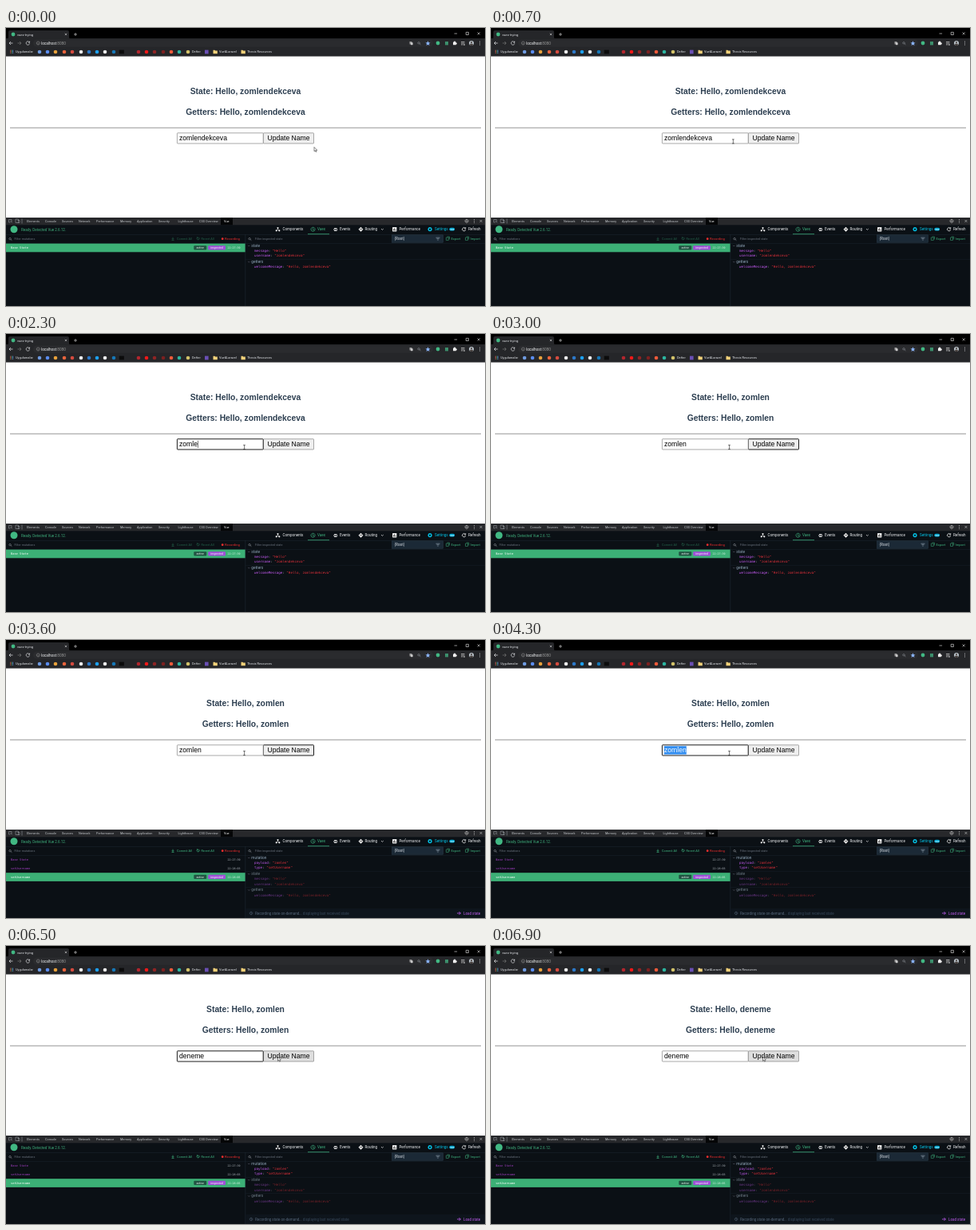
An HTML page for the animation above (7100 ms loop, 600x349 px).

```html
<!DOCTYPE html>
<html lang="en">
<head>
<meta charset="utf-8">
<style>
  html, body { margin: 0; width: 100%; height: 100%; overflow: hidden; background: #fff; }
  svg { display: block; width: 600px; height: 349px; font-family: Roboto, sans-serif; white-space: pre; }
  .page { font-family: "Liberation Sans", Arial, sans-serif; }
  .mono { font-family: "DejaVu Sans Mono", monospace; }
</style>
</head>
<body>
<svg viewBox="0 0 600 349"><g id="fixed"></g><g id="live"></g></svg>
<script>
const LOOP = 7100, STEP = 100;
const FULL = 'zomlendekceva', SHORT = 'zomlen', LAST = 'deneme';
const GREEN = '#41b883', GREY = '#9aa0a6', LIGHT = '#e4e7eb';

const rect = (x, y, w, h, fill, extra = '') =>
  `<rect x="${x}" y="${y}" width="${w}" height="${h}" fill="${fill}" ${extra}/>`;
const dot = (x, y, r, fill) => `<circle cx="${x}" cy="${y}" r="${r}" fill="${fill}"/>`;
const line = (d, color, width = 0.7) =>
  `<path d="${d}" fill="none" stroke="${color}" stroke-width="${width}"/>`;
const text = (x, y, s, size, fill, extra = '') =>
  `<text x="${x}" y="${y}" font-size="${size}" fill="${fill}" ${extra}>${s}</text>`;
const mono = (x, y, s, size, fill) => text(x, y, s, size, fill, 'class="mono"');
const row = (items, y, size, fill) => items.map(([x, s]) => text(x, y, s, size, fill)).join('');
const lens = (x, y) => line(`M${x - 1} ${y - 1}a1.2 1.2 0 1 0 .1 0M${x} ${y + 1}l1.4 1.3`, GREY, 0.6);

function browserChrome() {
  const icons = [[42, '#6f9be0'], [52, '#5b8def'], [62, '#e9a23b'], [73, '#e8643c'], [83, '#d54b3f'],
    [94, '#eee'], [104, '#2d78c8'], [114, '#1da1f2'], [124, '#eee'], [135, '#1678b8'],
    [166, '#b3262e'], [176, '#f01818'], [186, '#8f2424'], [197, '#7c2020'], [207, '#ee5a3a'],
    [217, '#2cb5a0'], [228, '#d4c36a']];
  const folder = x => `<path d="M${x} 27.7h2l.7.8h2.6v3.8h-5.3z" fill="#f3d27a"/>`;
  let apps = '';
  for (let i = 0; i < 9; i++)
    apps += rect(5.2 + i % 3 * 1.5, 27.7 + Math.floor(i / 3) * 1.5, 1, 1, ['#ea5a4f', '#58a55c', '#4f8ff0'][i % 3]);
  return rect(0, 0, 600, 13.5, '#000') +
    rect(0, 13, 600, 22.6, '#252629') +
    `<path d="M1 13.5q2 0 2-2V5q0-2 2-2H77q2 0 2 2v6.5q0 2 2 2z" fill="#252629"/>` +
    dot(9, 8, 2.4, GREEN) + text(14, 9.6, 'vuex-trying', 4.15, LIGHT) +
    line('M73.8 6.7l2.4 2.4m0-2.4l-2.4 2.4M87 6v4m-2-2h4', '#ddd', 0.6) +
    line('M561.5 7h3.6M576.2 5.3h3.2v3.2h-3.2zM590.6 5.4l3 3m0-3l-3 3', '#eee', 0.6) +
    line('M8.5 19h-4.5m2-2l-2 2 2 2', '#e8eaed') +
    line('M14.5 19h4.5m-2-2l2 2-2 2', '#777') +
    line('M29.3 17.8a2.2 2.2 0 1 0 .3 1.6m0-2.8v1.6h-1.6', '#e8eaed') +
    rect(34, 14.5, 501, 9.2, '#2a2b2e', 'rx="4.6"') +
    line('M40.2 17a2 2 0 1 0 .1 0m-.1 1.7v1.6', '#aaa', 0.5) +
    text(44, 20.7, 'localhost<tspan fill="#999">:8080</tspan>', 4.7, '#f1f3f4') +
    rect(505.5, 17, 3, 3.6, '#999', 'rx=".4"') + rect(507, 18.2, 2.6, 3, '#ccc', 'rx=".4"') + lens(518, 18.6) +
    '<path d="M528.5 16.2l.9 2 2.1.2-1.6 1.4.5 2.1-1.9-1.1-1.9 1.1.5-2.1-1.6-1.4 2.1-.2z" fill="#8ab4f8"/>' +
    dot(541, 19, 2.4, GREEN) + rect(550, 17, 4, 4.4, '#3c8f6c') +
    rect(560, 17.5, 3.8, 3.8, '#eee', 'rx=".5"') + dot(562, 17.4, 1, '#eee') + dot(564, 19.5, 0.9, '#eee') +
    line('M570 17.5h4.5M570 19.2h4.5M570 20.9h2.5', '#eee', 0.6) + dot(574, 21, 0.8, '#eee') +
    dot(583, 19, 3, '#b9c2c9') + dot(583, 18, 1.1, '#49423f') +
    '<path d="M580.8 21a2.3 2 0 0 1 4.4 0 3 3 0 0 1-4.4 0" fill="#49423f"/>' +
    [17, 19, 21].map(y => dot(593.5, y, 0.5, '#ddd')).join('') +
    apps + icons.map(([x, c]) => dot(x, 30, 2.3, c)).join('') +
    rect(141.8, 27.6, 6, 4.8, '#0b0b0b') +
    rect(249, 27.6, 4.6, 4.8, '#6a4fb5') + folder(259.5) + folder(294.5) +
    row([[12, 'Uygulamalar'], [233, 'Defter'], [267, 'Vue&amp;Laravel'], [302, 'Thesis Resources']], 31.4, 3.95, LIGHT);
}

function devtoolsFrame() {
  const tabs = [[26, 'Elements'], [49, 'Console'], [70, 'Sources'], [91, 'Network'], [113, 'Performance'],
    [143, 'Memory'], [164, 'Application'], [191, 'Security'], [215.5, 'Lighthouse'], [242, 'CSS Overview']];
  const panels = [[346.5, 'Components'], [418, 'Events'], [449.5, 'Routing'], [492.5, 'Performance'], [579, 'Refresh']];
  return rect(0, 238, 600, 111, '#0b1015') +
    rect(0, 238, 600, 9.3, '#27282b') + rect(269, 238, 15, 9.3, '#050607') +
    line('M7 243.5v-3H3.5v3.5h2M5.5 242.2l2.2 2.2M12 240h3.5v4.5H12zM14.5 241.5h2.5v3h-2.5M20 239.5v6', GREY, 0.55) +
    row(tabs, 243.9, 3.85, '#c4c8cc') + text(273, 243.9, 'Vue', 3.85, '#fff') +
    line('M577 240.3a2 2 0 1 0 .1 0M577 241.8a.5.5 0 1 0 .1 0', '#bbb', 0.8) +
    [240.5, 242.4, 244.3].map(y => dot(586.5, y, 0.5, '#ccc')).join('') +
    line('M593.5 241l2.8 2.8m0-2.8l-2.8 2.8', '#ccc', 0.6) +
    dot(10, 252.8, 4.5, GREEN) + text(19, 254.7, 'Ready. Detected Vue 2.6.12.', 4.5, '#3fae7c') +
    row(panels, 254.4, 4.55, '#f0f2f4') +
    text(390, 254.4, 'Vuex', 4.55, GREEN) + text(537, 254.4, 'Settings', 4.55, '#03c2e6') +
    rect(555.3, 250.8, 6.8, 3.8, '#03a9d4', 'rx="1.8"') + text(556.3, 253.7, 'new', 2.7, '#e8faff') +
    dot(340.5, 251, 1.1, '#eee') + dot(338.7, 254.3, 1.1, '#eee') + dot(342.3, 254.3, 1.1, '#eee') +
    line('M340.5 251v2l-1.8 1.3m1.8-1.3l1.8 1.3', '#eee', 0.6) +
    line('M384.5 250.2a2.5 2.5 0 1 0 .1 0m0 1.2v1.6l1.2.7', GREEN, 0.7) +
    line('M411 251.5h3.5M410 253h5.5M411 254.5h3.5', '#eee', 0.9) +
    '<path d="M444.5 249.7l3 3-3 3-3-3z" fill="#eee"/>' +
    line('M443.5 253.5v-1h2.2m-.8-.9l.9.9-.9.9', '#111', 0.5) + line('M470 252l1.4 1.4 1.4-1.4', '#eee') +
    rect(484, 250, 5.4, 5.4, '#eee', 'rx=".6"') + line('M485.5 254.3v-1.8m1.2 1.8v-3m1.3 3v-1.2', '#111') +
    line('M531 250.8a1.9 1.9 0 1 0 .1 0', '#03c2e6', 1.5) +
    line('M575.3 251.4a2.1 2.1 0 1 0 .4 1.8m0-3v1.7h-1.7', '#eee', 0.8) +
    rect(378, 258.4, 27, 0.8, GREEN) +
    rect(0, 259, 600, 0.4, '#1f2b36') + rect(0, 270, 600, 0.4, '#1b2631') + rect(299.6, 259, 0.6, 90, '#1f2b36') +
    lens(6, 264.4) + text(10.5, 266.2, 'Filter mutations', 3.7, '#6c7580') +
    lens(306, 264.4) + text(312, 266.2, 'Filter inspected state', 3.7, '#6c7580') +
    dot(271.2, 264.7, 1.4, '#ee2d2d') + text(274, 266.2, 'Recording', 4.2, '#ee2d2d') +
    rect(483.5, 259.8, 64, 9.4, '#1b2936', 'stroke="#2b3c4c" stroke-width=".5"') + text(486.5, 266.3, '(Root)', 4.6, '#dfe5ea') +
    line('M538.5 263.2h5M539.5 264.7h3M540.4 266.2h1.2', '#9fb0bd', 0.6) +
    line('M551.3 263h3v3.4h-3zM552.5 262h3v3.4M575.5 263h3v3.4h-3zM576.7 262h3v3.4', GREEN, 0.5) +
    row([[557.5, 'Export'], [581.5, 'Import']], 266.2, 4.15, GREEN);
}

function mutations(committed) {
  const active = committed ? 292.2 : 270.6;
  const tool = committed ? GREEN : '#24614a';
  const tag = (x, w, s, fill) =>
    rect(x, active + 2.6, w, 5.3, fill, 'rx="1"') +
    text(x + w / 2, active + 6.5, s, 3.6, '#f4fff9', 'text-anchor="middle"');
  const entry = (y, name, time, on) =>
    mono(6, y, name, 3.65, on ? '#fff' : '#a33fc4') + mono(277.5, y, time, 3.3, on ? '#e2f5ec' : '#b7bec6');
  let s = line('M209 262.7v2.6m-1.2-1.1l1.2 1.2 1.2-1.2M207.5 266.4h3', tool, 0.7) +
    line('M239.6 263.2a1.5 1.5 0 1 0 1.6-.3m-1.6-.8v1.2h1.2', tool, 0.7) +
    row([[214, 'Commit All'], [244.5, 'Revert All']], 266.2, 3.85, tool) +
    rect(0, active, 299.6, 10.7, '#3cb076') +
    tag(235.3, 15.9, 'active', '#225443') + tag(253.2, 21.8, 'inspected', '#a050d8');
  s += entry(276.9, 'Base State', '22:27:39', !committed);
  if (committed) s += entry(287.7, 'setUsername', '22:28:03') + entry(298.5, 'setUsername', '22:28:05', true);
  return s;
}

function inspector(committed) {
  const title = (y, s, dim) =>
    line(`M303.2 ${y - 1.9}l1.1 1.1 1.1-1.1`, '#778', 0.5) + text(307.3, y, s, 4.8, dim ? '#6f7c88' : '#93a9bd');
  const field = (y, key, value, dim) => `<g opacity="${dim ? 0.5 : 1}">` +
    mono(311, y, `${key}<tspan fill="#aaa">: </tspan><tspan fill="#e0303a">"${value}"</tspan>`, 4.2, '#c45af0') + '</g>';
  const shift = committed ? 20.3 : 0;
  let s = title(274.8 + shift, 'state', committed) +
    field(280.9 + shift, 'message', 'Hello', committed) +
    field(287.4 + shift, 'username', FULL, committed) +
    rect(300, 290.1 + shift, 300, 0.4, '#18222c') +
    title(295 + shift, 'getters', committed) +
    field(301.2 + shift, 'welcomeMessage', 'Hello, ' + FULL, committed);
  if (committed)
    s += title(274.8, 'mutation') + field(280.9, 'payload', SHORT) + field(287.4, 'type', 'setUsername') +
      rect(300, 290.1, 300, 0.4, '#18222c') + rect(300, 337, 300, 12, '#0e151c') +
      line('M307 341.2a1.8 1.8 0 1 0 .1 0m0 .9v1l.7.5', '#56677a', 0.6) +
      text(312, 344.7, 'Recording state on-demand... <tspan fill="#37475a">displaying last received state</tspan>', 4.5, '#56677a') +
      line('M565 343h4.4m-1.9-1.9l1.9 1.9-1.9 1.9', '#c05cf0', 0.8) + text(573, 344.6, 'Load state', 4.5, '#c05cf0');
  return s;
}

const pen = document.createElement('canvas').getContext('2d');
pen.font = '8.65px "Liberation Sans", Arial, sans-serif';

// Letters of a word visible at time t when typed from start to end.
const typed = (word, t, start, end) =>
  word.slice(0, 1 + Math.floor((word.length - 1) * Math.min(1, (t - start) / (end - start))));
const ease = p => { p = Math.max(0, Math.min(1, p)); return p * p * (3 - 2 * p); };

function inputValue(t) {
  if (t < 1800) return FULL;
  if (t < 4800) return typed(SHORT, t, 1800, 2400);
  return typed(LAST, t, 4800, 5700);
}

function form(t) {
  const value = inputValue(t), width = pen.measureText(value).width;
  const selected = t >= 1200 && t < 1800 || t >= 4300 && t < 4800;
  const inputFocus = t >= 900 && t < 2700 || t >= 4000 && t < 6600;
  const buttonFocus = t >= 2700 && t < 4000, hover = t >= 6100;
  const greeting = t < 2800 ? FULL : t < 6700 ? SHORT : LAST;
  const heading = (y, s) => text(300, y, `${s}: Hello, ${greeting}`, 10.3, '#2c3e50', 'font-weight="700" text-anchor="middle"');
  const border = focus => `stroke="${focus ? '#1c1c1c' : '#858585'}" stroke-width="${focus ? 1 : 0.7}" rx=".6"`;
  return heading(83.4, 'State') + heading(109, 'Getters') +
    rect(322.3, 131.8, 63.2, 13.2, hover ? '#dedede' : '#efefef', border(buttonFocus)) +
    text(327.5, 141.3, 'Update Name', 8.6, '#000') +
    rect(214.4, 131.8, 107.8, 13.2, '#fff', border(inputFocus)) +
    (selected ? rect(217, 133.2, width, 10.4, '#2f8cf0') : '') +
    text(217, 141.3, value, 8.65, selected ? '#fff' : '#000') +
    (inputFocus && !selected && t < 6200 ? rect(217 + width, 133.8, 0.5, 9.2, '#000') : '');
}

function pointer(t) {
  const go = ease((t - 100) / 700), back = ease((t - 5700) / 700);
  const x = 386 - 87.5 * go + 42 * back, y = 149.5 - 7.5 * go - 3 * back;
  const beam = x < 322 && y < 145;
  return beam
    ? line(`M${x - 1.4} ${y - 2.6}h2.8M${x} ${y - 2.6}v5.2M${x - 1.4} ${y + 2.6}h2.8`, '#222', 0.6)
    : `<path d="M${x} ${y}v5.3l1.2-1.1 .9 1.9 .9-.4-.9-1.8h1.7z" fill="#fff" stroke="#111" stroke-width=".5"/>`;
}

const live = document.getElementById('live');
document.getElementById('fixed').innerHTML = rect(0, 0, 600, 349, '#fff') + browserChrome() +
  rect(5, 124.8, 590, 1, '#999') + devtoolsFrame();

let shown = -1;
function tick(now) {
  const t = Math.min(6900, Math.floor(now % LOOP / STEP) * STEP);
  if (t !== shown) {
    const committed = t >= 3100;
    live.innerHTML = `<g class="page">${form(t)}</g>` + mutations(committed) + inspector(committed) + pointer(t);
    shown = t;
  }
  requestAnimationFrame(tick);
}
tick(performance.now());
</script>
</body>
</html>
```
